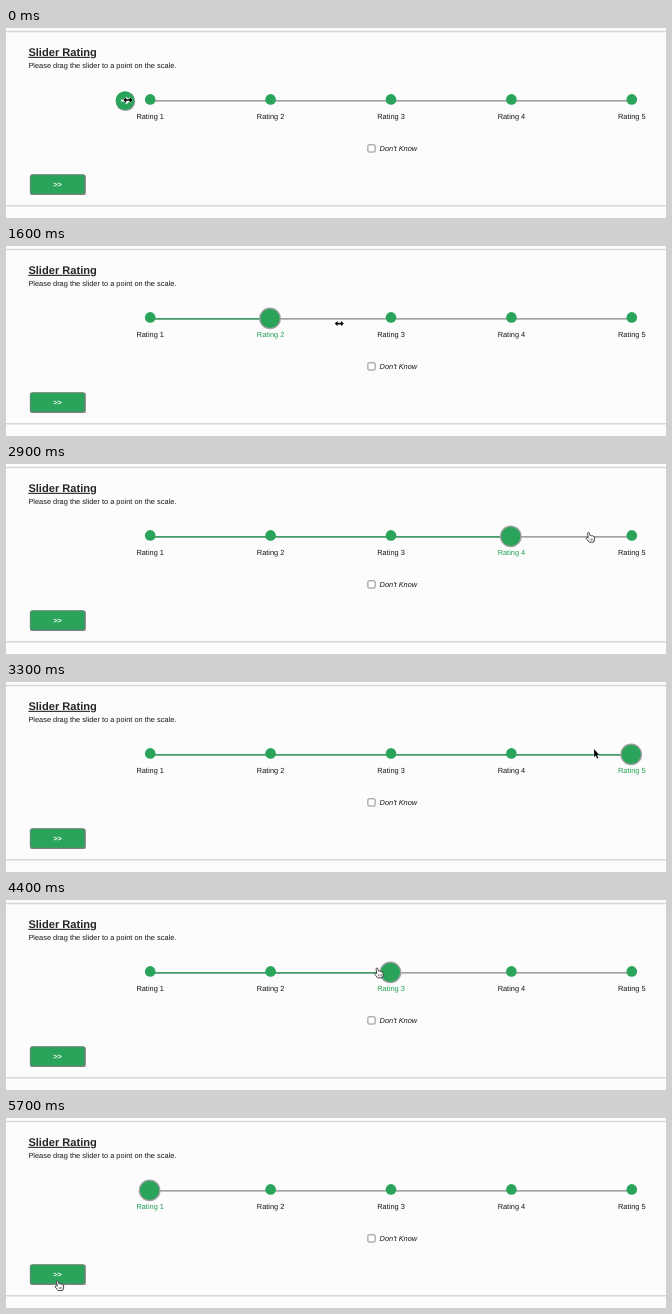
Recreate the animation shown at these times as an HTML page. Size 660 by 190 pixels, loop 5800 ms.

```html
<!DOCTYPE html>
<html lang="en">
<head>
<meta charset="utf-8">
<title>Slider Rating</title>
<style>
  html, body { margin: 0; width: 100%; height: 100%; overflow: hidden; background: #fcfcfd; }
  svg { display: block; width: 100vw; height: 100vh; }
  text {
    font: 7.4px "Liberation Sans", Arial, sans-serif;
    fill: #161616;
    text-rendering: geometricPrecision;
  }
  .title { font-size: 11.1px; font-weight: bold; text-decoration: underline; fill: #262626; }
  .note { font-style: italic; }
  .mid text, .go { text-anchor: middle; }
  .go { font-weight: bold; fill: #fff; }
  .mid text.on { fill: #1fa04f; }
  .green { fill: #2aa45b; }
  .rule { stroke: #d6d6d7; stroke-width: 1.5; }
  .track { stroke: #858585; stroke-width: 1.1; }
  .fill { stroke: #2a9d58; stroke-width: 1.2; }
</style>
</head>
<body>
<svg viewBox="0 0 660 190">
  <path class="rule" d="M0 3.4H660M0 177.7H660"/>
  <text class="title" x="22.4" y="27.8">Slider Rating</text>
  <text x="22.4" y="40.3">Please drag the slider to a point on the scale.</text>

  <path class="track" d="M144 72.9H626"/>
  <path class="fill" id="fill"/>
  <g id="dots" class="green"></g>
  <g id="labels" class="mid"></g>

  <rect x="361.9" y="116.8" width="7.2" height="7.2" rx=".9" fill="#fff" stroke="#6e6e6e" stroke-width=".8"/>
  <text class="note" x="373.6" y="122.8">Don't Know</text>

  <rect x="24" y="146.5" width="55.8" height="20.6" rx="2.2" fill="#848484"/>
  <rect class="green" x="24.3" y="146.8" width="54.5" height="19.2" rx="2" stroke="#6f7f76" stroke-width=".8"/>
  <text class="go" x="51.6" y="158.7">&gt;&gt;</text>

  <g id="start">
    <circle cx=".4" cy=".6" r="9.8" fill="#8f9a94"/>
    <circle class="green" r="9.3"/>
    <path d="M-4 0H4M1 -3L4.2 0L1 3" fill="none" stroke="#fff" stroke-width="1.7"/>
  </g>
  <g id="knob">
    <circle r="10.9" fill="#a3a0a2"/>
    <circle class="green" r="9.6"/>
  </g>

  <g id="cursor" stroke-linejoin="round">
    <path id="resize" d="M-4.5 0L-1.8 -2.7V-.8H1.8V-2.7L4.5 0L1.8 2.7V.8H-1.8V2.7Z"
      fill="#000" stroke="#fff" stroke-width=".7" paint-order="stroke"/>
    <path id="arrow" d="M-2.3 -5V3L-.6 1.5L.7 4.6L1.9 4.1L.6 1.1H2.7Z"
      fill="#000" stroke="#fff" stroke-width=".6" paint-order="stroke"/>
    <g id="hand">
      <path d="M-2.2 .6L-3 -3.9Q-2.6 -5.6 -1.3 -4.4L-.5 -1.6Q.4 -2.3 1 -1.4Q2 -2 2.6 -.9Q3.9 -1.1 4.1 .5V2.6L3.2 5H-1.4L-4.2 1.6Q-4.4 .1 -3.2 .2Z"
        fill="#fff" stroke="#222" stroke-width=".8"/>
      <path d="M-.4 1.4V3.5M1 1.4V3.5M2.4 1.4V3.5" stroke="#222" stroke-width=".5"/>
    </g>
  </g>
</svg>
<script>
  const LOOP = 5800, STEP = 100, LAG = 200, GRAB = 300;
  const FIRST = 144.2, GAP = 120.4;
  const $ = id => document.getElementById(id);
  const dotX = n => FIRST + (n - 1) * GAP;

  // time, x, y, and the cursor shape used from there on
  const path = [
    [0, 122, 72, "resize"],
    [900, 259, 76, "resize"],
    [2200, 397, 79, "hand"],
    [2400, 397, 79, "hand"],
    [3000, 622, 72, "arrow"],
    [3300, 590.4, 72, "arrow"],
    [3900, 484, 67.6, "hand"],
    [4900, 262, 78, "resize"],
    [5100, 180, 79, "resize"],
    [5500, 76, 146, "hand"],
    [5700, 53.5, 167.5, "hand"]
  ];

  function pointer(t) {
    const next = path.findIndex(k => k[0] > t);
    if (next < 0) return path[path.length - 1].slice(1);
    const [a, ax, ay, shape] = path[next - 1], [b, bx, by] = path[next];
    const u = (t - a) / (b - a);
    return [ax + (bx - ax) * u, ay + (by - ay) * u, shape];
  }

  // The knob snaps to the dot nearest to where the pointer was a moment ago.
  function ratingAt(t) {
    if (t < GRAB) return 0;
    const n = Math.round((pointer(t - LAG)[0] - FIRST) / GAP) + 1;
    return Math.min(5, Math.max(1, n));
  }

  function add(parent, tag, attrs, text = "") {
    const el = document.createElementNS("http://www.w3.org/2000/svg", tag);
    for (const k in attrs) el.setAttribute(k, attrs[k]);
    el.textContent = text;
    return $(parent).appendChild(el);
  }

  const labels = [1, 2, 3, 4, 5].map(n => {
    add("dots", "circle", { cx: dotX(n), cy: 71.4, r: 5.3 });
    return add("labels", "text", { x: dotX(n), y: 90.9 }, "Rating " + n);
  });

  const place = (id, x, y) => $(id).setAttribute("transform", `translate(${x} ${y})`);
  const show = (id, on) => $(id).style.display = on ? "" : "none";

  function draw(ms) {
    const t = Math.floor(ms % LOOP / STEP) * STEP;
    const rating = ratingAt(t);
    const [x, y, shape] = pointer(t);

    show("start", !rating);
    show("knob", rating);
    place("start", x - 3, 72.6);
    place("knob", dotX(rating) - .6, 72.4);
    $("fill").setAttribute("d", `M${FIRST} 72.9H${dotX(Math.max(rating, 1))}`);
    labels.forEach((el, i) => el.classList.toggle("on", i + 1 === rating));

    place("cursor", x, y);
    for (const id of ["resize", "arrow", "hand"]) show(id, id === shape);
  }

  const begin = performance.now();
  function tick() {
    draw(performance.now() - begin);
    requestAnimationFrame(tick);
  }
  tick();
</script>
</body>
</html>
```
